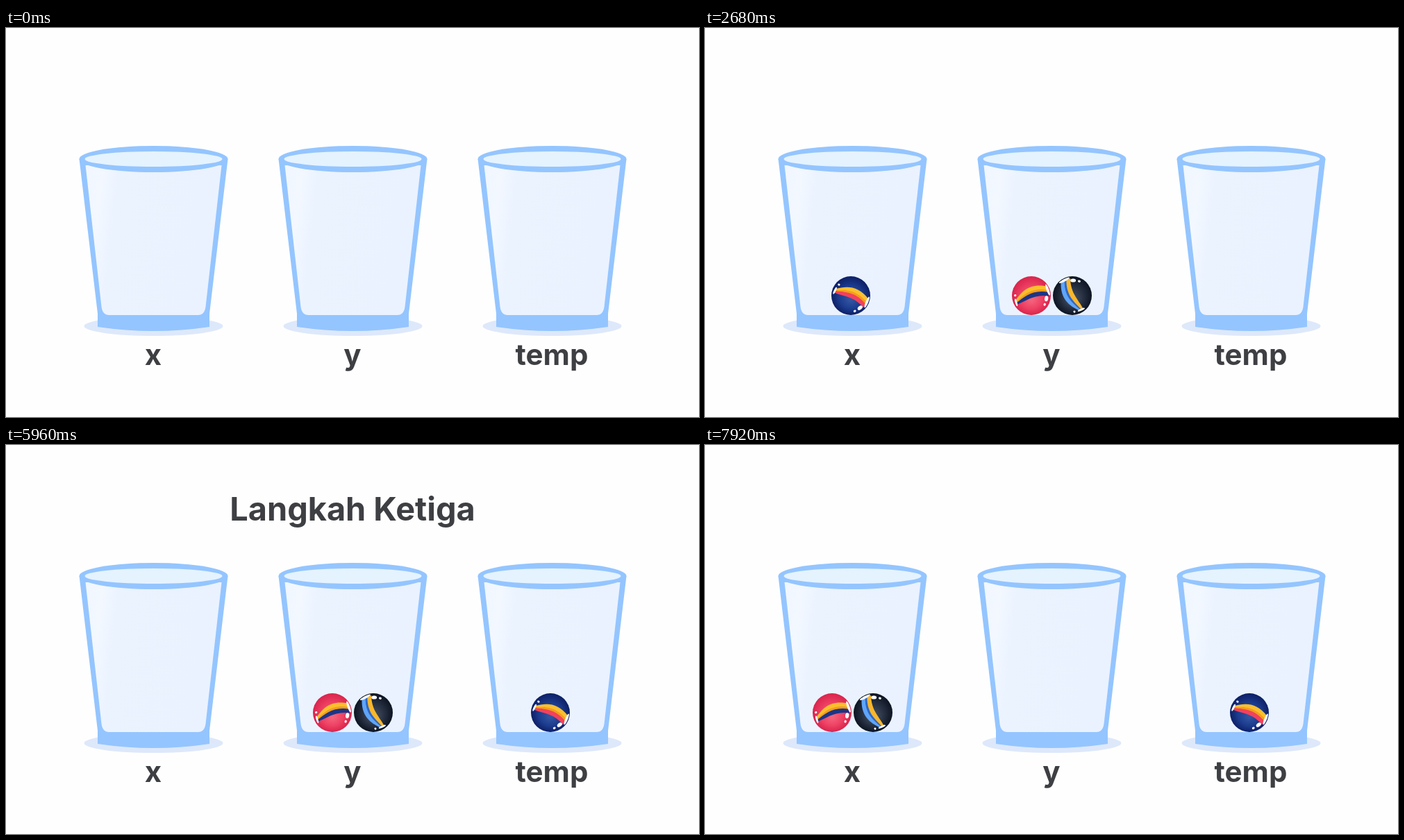
An HTML page with a canvas for the animation above (8 s loop, 998 px wide and 561 px high).

```html
<!DOCTYPE html>
<html lang="id">
<head>
<meta charset="utf-8">
<title>Tukar nilai x dan y</title>
<style>
  html, body { margin: 0; width: 100%; height: 100%; overflow: hidden; background: #fefefe; }
  canvas { display: block; width: 998px; height: 561px; }
</style>
</head>
<body>
<canvas id="stage" width="998" height="561"></canvas>
<script>
const ctx = document.getElementById('stage').getContext('2d');
const LOOP = 8000, GAP = 287, FLOOR = 386, RADIUS = 28;
const INK = '#3e3f43', EDGE = '#94c5ff';

const clamp01 = v => Math.max(0, Math.min(1, v));

// Damped spring from 0 to 1, time in ms
function spring(t) {
  if (t <= 0) return 0;
  return t > 460 ? 1 : 1 - Math.exp(-0.015 * t) * Math.cos(t * Math.PI / 110);
}

// Swells slightly, then shrinks to nothing
function shrink(p) {
  return 1 - (2.2 * p ** 3 - 1.2 * p ** 2);
}

const TITLES = [
  { text: 'Langkah Pertama', start: 740, end: 2350 },
  { text: 'Langkah Kedua', start: 3275, end: 5050 },
  { text: 'Langkah Ketiga', start: 5895, end: 7590 }
];

const MARBLES = [
  { x: 210, dx: 574, pop: 60, jump: 3871, turn: 20,
    body: ['#31539f', '#1c3c8f', '#0d1f66'], bands: ['#fbbf2d', '#f59e1b', '#f3415c'] },
  { x: 470, dx: -GAP, pop: 60, jump: 6517, turn: -22,
    body: ['#f4617b', '#ee4163', '#d9244d'], bands: ['#fbbf2d', '#f59e1b', '#1d3585'] },
  { x: 529, dx: -GAP, pop: 60, jump: 6517, turn: 240,
    body: ['#465164', '#252f40', '#0d1422'], bands: ['#5fa5fa', '#2f68c8', '#fbb72b'] }
];
const JUMP_TIME = 755;

function ellipse(x, y, rx, ry, fill, turn = 0) {
  ctx.beginPath();
  ctx.ellipse(x, y, rx, ry, turn, 0, Math.PI * 2);
  ctx.fillStyle = fill;
  ctx.fill();
}

function label(text, x, y, scale = 1) {
  ctx.save();
  ctx.translate(x, y);
  ctx.scale(scale, scale);
  ctx.font = '700 42px Inter, sans-serif';
  ctx.textAlign = 'center';
  ctx.fillStyle = INK;
  ctx.fillText(text, 0, 15);
  ctx.restore();
}

function glass(x) {
  ctx.save();
  ctx.translate(x, 0);
  ellipse(0, 430, 100, 14, '#dde8fb');

  // Outer wall and base
  ctx.beginPath();
  ctx.moveTo(-107, 189);
  ctx.lineTo(-80.5, 412);
  ctx.lineTo(-80.5, 431);
  ctx.quadraticCurveTo(0, 443, 80.5, 431);
  ctx.lineTo(80.5, 412);
  ctx.lineTo(107, 189);
  ctx.closePath();
  ctx.fillStyle = EDGE;
  ctx.fill();

  // Inner wall
  const shine = ctx.createLinearGradient(-98, 0, 98, 22);
  shine.addColorStop(0, '#eaf3ff');
  shine.addColorStop(0.14, '#f1f7ff');
  shine.addColorStop(0.24, '#f3f8ff');
  shine.addColorStop(0.36, '#ebf3ff');
  shine.addColorStop(1, '#eaf2ff');
  ctx.beginPath();
  ctx.moveTo(-98, 198);
  ctx.lineTo(-75, 402);
  ctx.quadraticCurveTo(-73.5, 414, -64, 414);
  ctx.lineTo(64, 414);
  ctx.quadraticCurveTo(73.5, 414, 75, 402);
  ctx.lineTo(98, 198);
  ctx.closePath();
  ctx.fillStyle = shine;
  ctx.fill();

  // Rim
  ellipse(0, 189, 107, 19, EDGE);
  ellipse(0, 189, 99, 11, '#e5f3ff');
  ctx.restore();
}

// Boundary k of the ribbon: 0 is its upper edge, 1 its lower edge
function ribbonEdge(k) {
  return [[-24, -2 + 6 * k], [-10, -11 + 16 * k], [4, -18 + 17 * k], [26 - 3 * k, -4 + 14 * k]];
}

function ribbon(from, to, fill) {
  const a = ribbonEdge(from), b = ribbonEdge(to);
  ctx.beginPath();
  ctx.moveTo(...a[0]);
  ctx.bezierCurveTo(...a[1], ...a[2], ...a[3]);
  ctx.lineTo(...b[3]);
  ctx.bezierCurveTo(...b[2], ...b[1], ...b[0]);
  ctx.closePath();
  ctx.fillStyle = fill;
  ctx.fill();
}

function marble(m, x, y, scale) {
  ctx.save();
  ctx.translate(x, y);
  ctx.scale(scale, scale);
  const body = ctx.createRadialGradient(0, 6, 2, 0, 0, RADIUS);
  m.body.forEach((c, i) => body.addColorStop([0, 0.55, 1][i], c));
  ellipse(0, 0, RADIUS, RADIUS, body);

  ctx.beginPath();
  ctx.arc(0, 0, RADIUS, 0, Math.PI * 2);
  ctx.clip();
  ctx.rotate(m.turn * Math.PI / 180);
  ribbon(0, 0.42, m.bands[0]);
  ribbon(0.38, 0.62, m.bands[1]);
  ribbon(0.58, 1, m.bands[2]);

  // Glints
  ellipse(25, 1, 1.8, 8.5, '#fff', 0.04);
  ellipse(-24, 1, 1.4, 5.5, '#fff', 0.1);
  ellipse(18.5, 12, 4, 2.6, '#fff', 2.1);
  ellipse(13, 19, 2, 1.6, '#fff', 2.4);
  ellipse(-21.5, -9, 1.7, 1.5, '#fff');
  ctx.restore();
}

// Arc from glass to glass with steep ends
function position(m, t) {
  const p = clamp01((t - m.jump) / JUMP_TIME), q = 1 - p;
  const lean = -12 * Math.sign(m.dx) * 3 * p * q * (q - p);
  return [m.x + m.dx * p * p * (3 - 2 * p) + lean, FLOOR - 362 * 3 * p * q];
}

function draw(t) {
  ctx.fillStyle = '#fefefe';
  ctx.fillRect(0, 0, 998, 561);

  ['x', 'y', 'temp'].forEach((name, i) => {
    glass(212.5 + GAP * i);
    label(name, 212 + GAP * i, 471);
  });

  for (const m of MARBLES) {
    const size = spring(t - m.pop);
    if (size > 0) marble(m, ...position(m, t), size);
  }

  for (const { text, start, end } of TITLES) {
    const scale = spring(t - start) * shrink(clamp01((t - end) / 310));
    if (scale > 0.01) label(text, 499, 92, scale);
  }
}

const begin = performance.now();
function frame() {
  draw((performance.now() - begin) % LOOP);
  requestAnimationFrame(frame);
}
draw(0);
requestAnimationFrame(frame);
</script>
</body>
</html>
```
